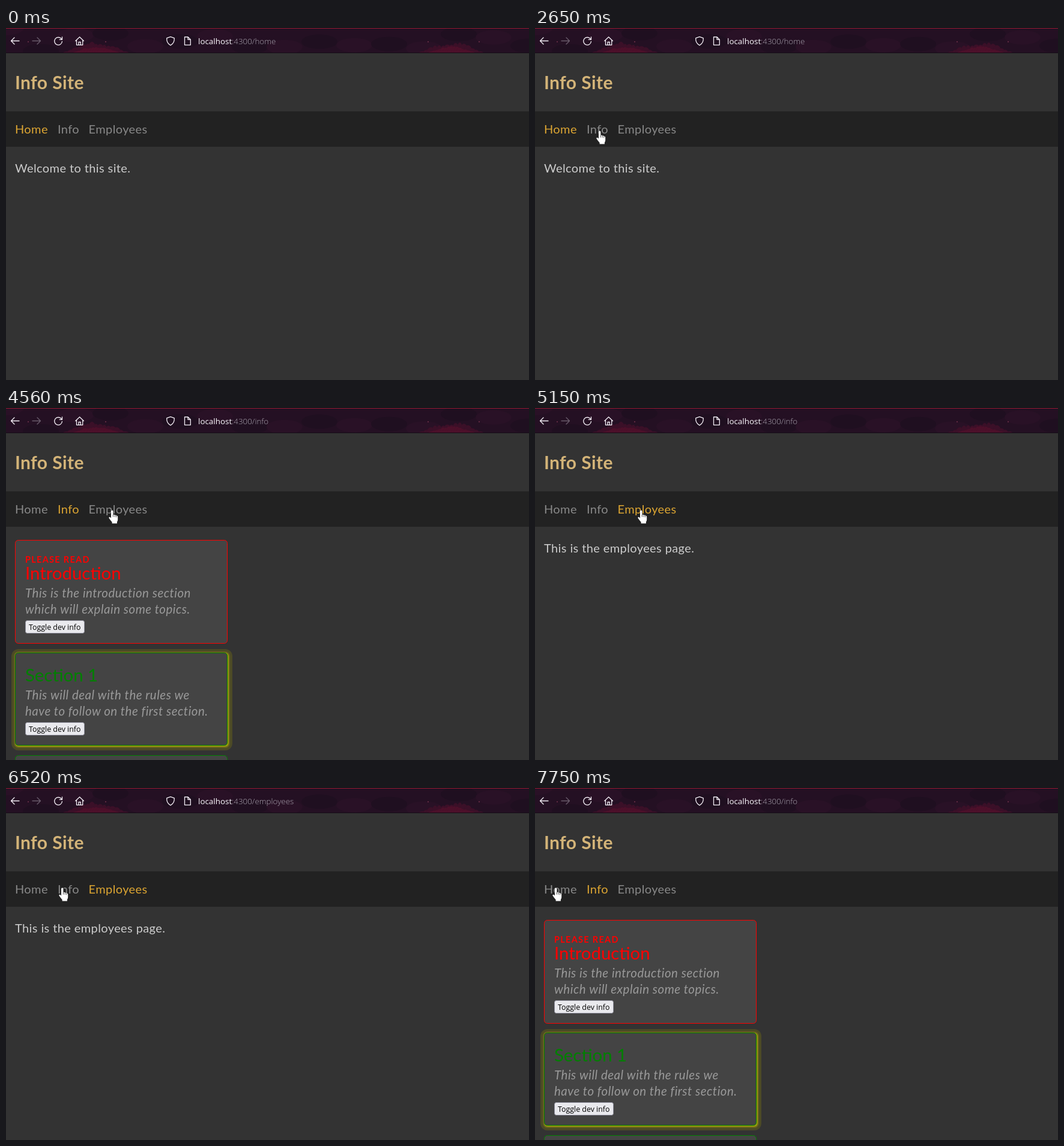
Animation, 871 px wide and 587 px high, one loop 8000 ms. Source, as an HTML page:

```html
<!DOCTYPE html>
<html lang="en">
<head>
<meta charset="utf-8">
<title>Info Site</title>
<style>
  html, body { margin: 0; width: 100%; height: 100%; overflow: hidden; background: #333; }
  svg { display: block; }
  text { font: 20px Lato, sans-serif; letter-spacing: .4px; fill: #ccc; white-space: pre; }
  .title { font-size: 30px; font-weight: 700; fill: #d4b478; }
  .nav { fill: #888; }
  .nav.active { fill: #dca532; }
  .url { font: 13.4px "Open Sans", sans-serif; letter-spacing: 0; fill: #fbfbfe; }
  .path { font-weight: 300; fill: #aaa3af; }
  .kicker { font-size: 14.5px; font-weight: 700; letter-spacing: 1.3px; fill: red; }
  .heading { font-size: 29.4px; letter-spacing: 0; }
  .body { font-size: 20.5px; font-style: italic; letter-spacing: .5px; fill: #999; }
  .button { font: 12.4px "Open Sans", sans-serif; letter-spacing: 0; fill: #000; }
  .icon { fill: none; stroke: #f4eff6; stroke-width: 1.3; stroke-linecap: round; stroke-linejoin: round; }
</style>
</head>
<body>
<svg width="871" height="587" viewBox="0 0 871 587">
  <clipPath id="bar"><path d="M0 0H871V41H0z"/></clipPath>
  <rect width="871" height="587" fill="#333"/>
  <g clip-path="url(#bar)">
    <rect width="871" height="42" fill="#241023"/>
    <g id="sky"></g>
    <path d="M0 .5H871" stroke="#921a30"/>
  </g>
  <path d="M0 41.5H871" stroke="#160d18"/>
  <g class="icon">
    <path d="M22 21.5H8.5m5.5-5.5l-5.5 5.5 5.5 5.5"/>
    <path d="M44 21.5h13.5m-5.5-5.5l5.5 5.5-5.5 5.5" stroke="#6a5c6c"/>
    <path d="M92.2 18a6.4 6.4 0 1 0 1.3 4.3M93.5 15v4.3h-4.3"/>
    <path d="M115.8 21.5l6.8-6.5 6.8 6.5M117.5 20.5v7.8h10.2v-7.8M121 28v-4.5h3.3V28"/>
    <path d="M274 14.6l6.3 2.2c.3 5.6-1.5 9.6-6.3 12-4.8-2.4-6.6-6.4-6.3-12z"/>
    <path d="M297.5 15h5.5l4.3 4.3v9h-9.8zM303 15v4.3h4.3"/>
  </g>
  <text class="url" x="320" y="27">localhost<tspan class="path" id="path"></tspan></text>
  <text class="title" x="15" y="102">Info Site</text>
  <rect y="139" width="871" height="59" fill="#222"/>
  <text class="nav" x="15" y="176">Home</text>
  <text class="nav" x="86" y="176">Info</text>
  <text class="nav" x="137.5" y="176">Employees</text>
  <g class="page"><text x="15" y="241">Welcome to this site.</text></g>
  <g class="page" id="info"></g>
  <g class="page"><text x="15" y="241">This is the employees page.</text></g>
  <g id="arrow" stroke="#000" fill="#fff">
    <path d="M.5.5V16.5L4.3 13 6.8 18.8 9.2 17.8 6.8 12H11.8z"/>
  </g>
  <g id="hand" stroke="#222" stroke-width=".8" fill="#fff">
    <path paint-order="stroke" d="M5 2.2a1.7 1.7 0 0 1 3.4 0V8q2.3-.8 2.8.7 2-.5 2.6.9 2.4-.3 2.4 2V16q0 2.4-1.3 4v2.5H6.6v-2.3Q3.6 17 1.4 13.6q-.4-2 1.6-1.8l2 1.7z"/>
    <path d="M8.4 8v3.6M11.2 8.8v3M13.8 9.8v2.5"/>
  </g>
</svg>
<script>
const LOOP = 8000;
const HOME = 0, INFO = 1, STAFF = 2;
const $ = id => document.getElementById(id);

let seed = 7;
const random = () => (seed = seed * 16807 % 2147483647) / 2147483647;
const repeat = (n, make) => Array.from({ length: n }, (_, i) => make(i)).join('');

const blob = (x, y, rx, ry, fill) =>
  `<ellipse cx="${x}" cy="${y}" rx="${rx}" ry="${ry}" fill="${fill}"/>`;

// A low bank of puffs, tallest in the middle.
const cloud = (x, width, height, fill) => repeat(15, i =>
  blob(x + (i / 14 - .5) * width, 42, 5 + 3 * random(),
    3 + height * Math.sin(Math.PI * i / 14) * (.6 + .4 * random()), fill));

$('sky').innerHTML =
  repeat(16, i => blob(i * 58, 42 * random(), 30, 12, i % 2 ? '#1f0f20' : '#291126')) +
  [150, 742].map(x => cloud(x, 96, 17, '#3b1028') + cloud(x, 64, 9, '#4c102a')).join('') +
  [37, 166, 703, 788].map(x => blob(x, 23, 1, 1, '#74334c')).join('');

const text = (cls, x, y, words, color) =>
  `<text class="${cls}" x="${x}" y="${y}"${color ? ` style="fill:${color}"` : ''}>${words}</text>`;

const box = (x, y, w, h, r, fill, stroke = 'none') =>
  `<rect x="${x}" y="${y}" width="${w}" height="${h}" rx="${r}" fill="${fill}" stroke="${stroke}"/>`;

// The card frame, grown evenly and nudged one pixel right and down.
const ring = (y, h, grow, fill) =>
  box(16 - grow, y + 1 - grow, 354 + 2 * grow, h + 2 * grow, 5 + grow, fill);

const card = (y, h, color) => box(15.5, y + .5, 353, h - 1, 5, '#444', color);

const content = (y, color, heading, lines) =>
  text('heading', 32, y, heading, color) +
  lines.map((line, i) => text('body', 32, y + 30 + 27 * i, line)).join('') +
  box(32.5, y + 68.5, 98, 21, 3, '#e9e9ed', '#8f8f9d') +
  text('button', 38, y + 84, 'Toggle dev info');

$('info').innerHTML =
  card(220, 173, 'red') +
  text('kicker', 32, 258, 'PLEASE READ') +
  content(286, 'red', 'Introduction',
    ['This is the introduction section', 'which will explain some topics.']) +
  ring(408, 155, 7, '#4c4a26') +
  ring(408, 155, 3, '#67631e') +
  ring(408, 155, 1, '#94960e') +
  card(408, 155, 'green') +
  content(456, 'green', 'Section 1',
    ['This will deal with the rules we', 'have to follow on the first section.']) +
  card(579, 173, 'green');

const routes = ['home', 'info', 'employees'];
const visits = [
  { start: 0, page: HOME },
  { start: 3050, page: INFO },
  { start: 5150, page: STAFF, urlDelay: 150 },
  { start: 6920, page: INFO }
];

const linear = p => p;
const easeIn = p => p * p;
const easeOut = p => 1 - (1 - p) ** 2.3;
const smooth = p => p * p * (3 - 2 * p);

// Each move is drawn in a few evenly timed jumps; the pointer rests in between.
const moves = [
  { start: 840, end: 1350, jumps: 5, from: [564, 642], to: [207, 383], ease: easeOut },
  { start: 1780, end: 2380, jumps: 6, from: [207, 382], to: [101, 171], ease: smooth },
  { start: 4140, end: 4560, jumps: 4, from: [101, 170], to: [170, 170], ease: easeIn },
  { start: 5800, end: 6520, jumps: 6, from: [176, 170], to: [87, 166], ease: smooth },
  { start: 7340, end: 7750, jumps: 4, from: [85, 166], to: [28, 166], ease: linear }
];
const HAND_FROM = 2380;

const latest = (list, t) => list.findLast(item => item.start <= t);

function pointerAt(t) {
  const move = latest(moves, t);
  if (!move) return null;
  const { start, end, jumps, from, to, ease } = move;
  const jump = Math.floor((t - start) / (end - start) * (jumps - 1) + 1e-6) + 1;
  const p = ease(Math.min(jump / jumps, 1));
  return from.map((v, i) => Math.round(v + (to[i] - v) * p));
}

const show = (el, on) => el.setAttribute('visibility', on ? 'visible' : 'hidden');
const navs = document.querySelectorAll('.nav');
const views = document.querySelectorAll('.page');

function render(now) {
  const t = now % LOOP;
  const { start, page, urlDelay = 0 } = latest(visits, t);
  views.forEach((view, i) => show(view, i === page));
  navs.forEach((nav, i) => nav.classList.toggle('active', i === page));
  const urlPage = t < start + urlDelay ? latest(visits, start - 1).page : page;
  $('path').textContent = ':4300/' + routes[urlPage];

  const spot = pointerAt(t);
  show($('arrow'), spot && t < HAND_FROM);
  show($('hand'), spot && t >= HAND_FROM);
  if (spot) {
    const shape = t < HAND_FROM ? $('arrow') : $('hand');
    shape.setAttribute('transform', `translate(${spot})`);
  }
  requestAnimationFrame(render);
}
requestAnimationFrame(render);
</script>
</body>
</html>
```
